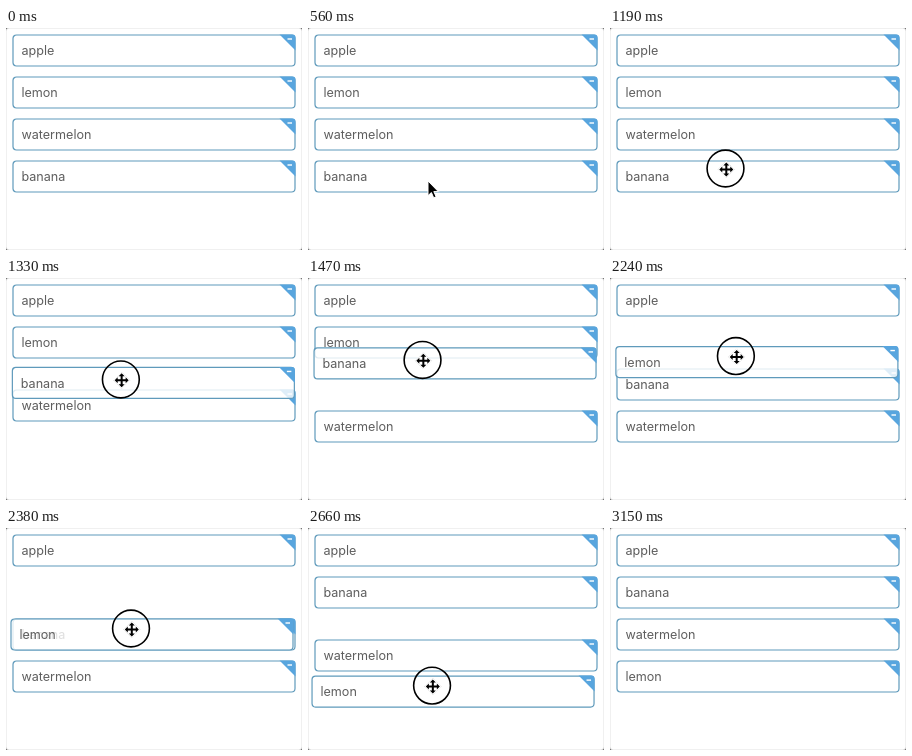
Write an HTML page that moves like this. It is 296 px wide and 222 px high and loops after 3220 ms.

```html
<!DOCTYPE html>
<html lang="en">
<head>
<meta charset="utf-8">
<title>Sortable list</title>
<style>
  html, body { margin: 0; width: 100%; height: 100%; overflow: hidden; background: #fff; }
  svg { display: block; width: 296px; height: 222px; }
  text { font: 12.6px Inter, Roboto, sans-serif; fill: #5e5e5e; }
</style>
</head>
<body>
<svg id="stage" viewBox="0 0 296 222">
  <rect width="296" height="222" fill="#777"/>
  <rect x=".5" y=".5" width="295" height="221" rx="2" fill="#fff" stroke="#f0f0f0"/>
  <g id="list"></g>
  <g id="pointer">
    <circle id="ring" fill="none" stroke="#000" stroke-width="1.6"/>
    <path id="arrow" d="M0 0V14.6L3.4 11.5 5.7 16.8 8.1 15.7 5.8 10.6H10.3Z"
          fill="#000" stroke="#fff" stroke-linejoin="round"/>
    <g id="move" transform="translate(.8 .9)">
      <path id="halo" d="M0-8L8 0 0 8-8 0Z" fill="#fff" stroke="#ccc"/>
      <path d="M0-7L3-4H1V-1H4V-3L7 0 4 3V1H1V4H3L0 7-3 4H-1V1H-4V3L-7 0-4-3V-1H-1V-4H-3Z"
            fill="#000" stroke="#fff" stroke-width="2" stroke-linejoin="round" paint-order="stroke"/>
    </g>
  </g>
</svg>
<script>
const LOOP = 3220, STEP = 70, LEFT = 7, SLIDE = 140;
const byId = id => document.getElementById(id);
const list = byId('list');
const slotY = n => 7 + 42 * n;
const mix = (a, b, k) => a + (b - a) * k;
const progress = (t, from, to) => Math.max(0, Math.min(1, (t - from) / (to - from)));
const easeOut = k => 1 - (1 - k) ** 2;
const show = (el, on) => el.setAttribute('visibility', on ? 'visible' : 'hidden');
const place = (el, x, y) => el.setAttribute('transform', `translate(${x} ${y})`);

// The pointer eases to each stop in turn.
const entry = { x: 131, y: 217 };
const stops = [
  { from: 70, to: 560, x: 120, y: 153 },
  { from: 1050, to: 1190, x: 115.5, y: 140.5 },
  { from: 1190, to: 1540, x: 114.5, y: 79.5 },
  { from: 1680, to: 1960, x: 124, y: 64.5 },
  { from: 1960, to: 2170, x: 127, y: 50 },
  { from: 2170, to: 2380, x: 125, y: 100.5 },
  { from: 2380, to: 2730, x: 124, y: 160 }
];
const presses = [{ from: 700, to: 1680, shrink: 280 }, { from: 2100, to: 2800, shrink: 140 }];

const items = [
  { name: 'apple' },
  { name: 'lemon', drag: { from: 2170, to: 2730, x: 127, y: 58.5, slot: 3 } },
  { name: 'watermelon', moves: [{ at: 1260, slot: 3 }, { at: 2590, slot: 2 }] },
  { name: 'banana', moves: [{ at: 2400, slot: 1 }], drag: { from: 1190, to: 1610, x: 115.5, y: 145, slot: 2 } }
];

for (const item of items) {
  item.el = document.createElementNS('http://www.w3.org/2000/svg', 'g');
  item.el.innerHTML = `
    <rect width="282" height="31" rx="3.5" fill="#fff" stroke="#5f9abb" stroke-width="1.2"/>
    <path d="M266.5-.5H279.5Q282.5-.5 282.5 2.5V15.5Z" fill="#58a5de"/>
    <path d="M274.5 4H279" stroke="#fff" stroke-width="1.4"/>
    <text x="8.4" y="20.3">${item.name}</text>`;
  item.box = item.el.querySelector('rect');
  list.append(item.el);
}

function pointerAt(t) {
  return stops.reduce((p, stop) => {
    const k = easeOut(progress(t, stop.from, stop.to));
    return { x: mix(p.x, stop.x, k), y: mix(p.y, stop.y, k) };
  }, entry);
}

function itemAt({ drag, moves = [] }, slot, t) {
  let x = LEFT, y = slotY(slot), lifted = false;
  if (drag && t > drag.from) {
    const p = pointerAt(Math.min(t, drag.to));
    const settle = progress(t, drag.to, drag.to + SLIDE);
    x = mix(x + p.x - drag.x, x, settle);
    y = mix(y + p.y - drag.y, slotY(drag.slot), settle);
    lifted = settle < 1;
  }
  for (const { at, slot } of moves) y = mix(y, slotY(slot), progress(t, at, at + SLIDE));
  return { x, y, lifted };
}

function render(time) {
  const t = Math.floor(time % LOOP / STEP) * STEP;

  items.forEach((item, slot) => {
    const { x, y, lifted } = itemAt(item, slot, t);
    place(item.el, x, y);
    item.box.setAttribute('fill-opacity', lifted ? .8 : 1);
    if (lifted && list.lastChild !== item.el) list.append(item.el);
  });

  const visible = t >= 70 && t < 2870;
  const moving = t >= 1120;
  const press = presses.find(({ from, to }) => t >= from && t < to);
  show(byId('arrow'), visible && !moving);
  show(byId('move'), visible && moving);
  show(byId('halo'), visible && moving && press);
  show(byId('ring'), visible && press);

  const p = pointerAt(t);
  place(byId('pointer'), p.x, p.y);
  if (press) {
    const k = progress(t, press.from, press.from + press.shrink);
    byId('ring').setAttribute('r', mix(22, 18.4, k));
    byId('ring').setAttribute('opacity', mix(.4, 1, k));
  }
}

const start = performance.now();
function tick() {
  render(performance.now() - start);
  requestAnimationFrame(tick);
}
tick();
</script>
</body>
</html>
```
